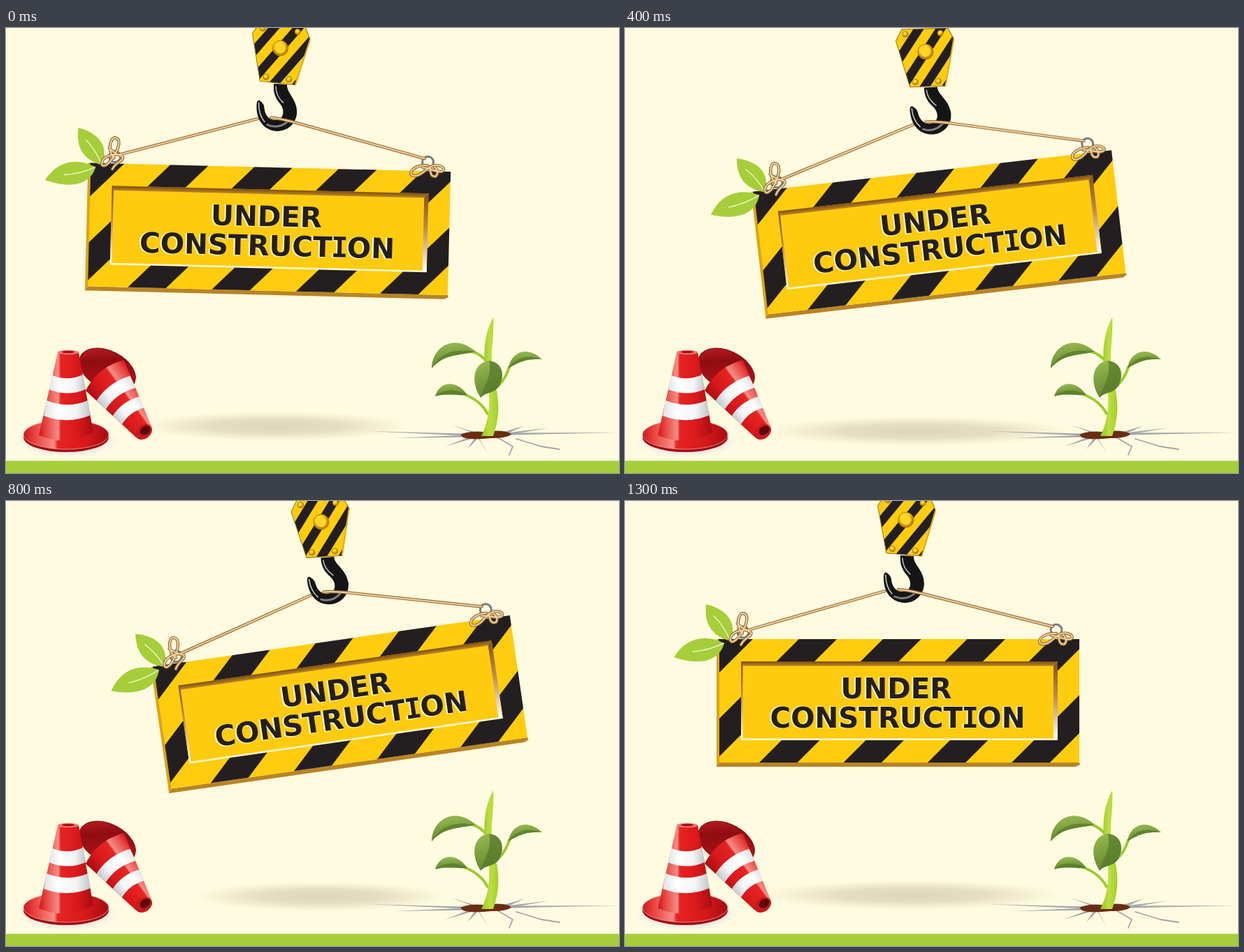
An HTML page for the animation above (1400 ms loop, 877x638 px).

```html
<!DOCTYPE html>
<html lang="en">
<head>
<meta charset="utf-8">
<title>Under construction</title>
<style>
  html, body { margin: 0; width: 100%; height: 100%; overflow: hidden; background: #fffbe0; }
  svg { display: block; width: 877px; height: 638px; }
  text { font: bold 40.4px "DejaVu Sans", Verdana, sans-serif; text-anchor: middle; }
  .serif { font-family: "DejaVu Sans Mono", monospace; }
  .line { fill: none; stroke-linecap: round; stroke-linejoin: round; }
</style>
</head>
<body>
<svg viewBox="0 0 877 638">
  <defs>
    <radialGradient id="soft">
      <stop offset="0" stop-color="#80704e" stop-opacity=".27"/>
      <stop offset=".5" stop-color="#80704e" stop-opacity=".2"/>
      <stop offset=".8" stop-color="#80704e" stop-opacity=".07"/>
      <stop offset="1" stop-color="#80704e" stop-opacity="0"/>
    </radialGradient>
    <radialGradient id="glow">
      <stop offset=".6" stop-color="#dcdcde"/>
      <stop offset="1" stop-color="#f4f3ee" stop-opacity="0"/>
    </radialGradient>
    <linearGradient id="stripes" gradientUnits="userSpaceOnUse" spreadMethod="repeat" x1="223" y1="223" x2="283.2" y2="283.2">
      <stop stop-color="#ffcc0e"/><stop offset=".012" stop-color="#231f20"/>
      <stop offset=".452" stop-color="#231f20"/><stop offset=".464" stop-color="#ffcc0e"/>
    </linearGradient>
    <linearGradient id="bars" gradientUnits="userSpaceOnUse" spreadMethod="repeat" x1="-5.4" y1="-3.8" x2="16.1" y2="11.2">
      <stop stop-color="#ffcc0e"/><stop offset=".04" stop-color="#231f20"/>
      <stop offset=".48" stop-color="#231f20"/><stop offset=".52" stop-color="#ffcc0e"/>
    </linearGradient>
    <linearGradient id="bevel" x2="0" y2="1">
      <stop stop-color="#85521b"/><stop offset=".45" stop-color="#bd8c4a"/><stop offset="1" stop-color="#fff"/>
    </linearGradient>
    <linearGradient id="brown" x2="0" y2="1">
      <stop stop-color="#7d4d17"/><stop offset="1" stop-color="#bd861f"/>
    </linearGradient>
    <radialGradient id="gold" cx=".4" cy=".35">
      <stop stop-color="#ffe870"/><stop offset=".6" stop-color="#fbc90f"/><stop offset="1" stop-color="#c58a0a"/>
    </radialGradient>
    <linearGradient id="red">
      <stop stop-color="#c9171b"/><stop offset=".12" stop-color="#e8403c"/><stop offset=".36" stop-color="#f58f88"/>
      <stop offset=".4" stop-color="#e62422"/><stop offset=".72" stop-color="#d9181b"/><stop offset="1" stop-color="#a50d12"/>
    </linearGradient>
    <linearGradient id="white">
      <stop stop-color="#dfe1e4"/><stop offset=".3" stop-color="#fff"/>
      <stop offset=".7" stop-color="#f3f4f5"/><stop offset="1" stop-color="#c2c4c9"/>
    </linearGradient>
    <linearGradient id="disc" x2="1" y2="1">
      <stop stop-color="#d32428"/><stop offset=".35" stop-color="#8e0d12"/><stop offset="1" stop-color="#c4161b"/>
    </linearGradient>
    <linearGradient id="leaf" x2=".25" y2="1">
      <stop stop-color="#9cbd55"/><stop offset=".5" stop-color="#7fa341"/><stop offset="1" stop-color="#658b33"/>
    </linearGradient>
    <linearGradient id="stem">
      <stop stop-color="#94c527"/><stop offset=".5" stop-color="#bcdf3f"/><stop offset="1" stop-color="#a2d02f"/>
    </linearGradient>

    <g id="cone">
      <path fill="url(#red)" d="M-15 0L-42 119Q-2 136 36 115L15 0Z"/>
      <path fill="url(#white)" d="M-23 33Q0 42 21 32L25 53Q0 64-28 53Z"/>
      <path fill="url(#white)" d="M-31 69Q0 81 28 69L32 90Q0 104-35 91Z"/>
    </g>
    <path id="rope" d="M176 185L372 129M391 127Q402 127 430 134L612 180"/>
    <path id="knots" d="M168 190C157 178 163 160 169 161C179 163 173 180 166 190C159 202 149 206 151 196C154 186 174 182 180 188C183 194 171 195 166 206
      M178 187Q166 182 161 176M617 190C602 189 590 197 594 204C603 209 612 198 620 192C630 186 643 192 639 197C634 202 616 192 610 193M621 193Q620 207 629 205Q634 199 627 192"/>
    <g id="words">
      <text x="388" y="282.5">UNDER</text>
      <text x="390" y="324.5">CONSTRUCT<tspan class="serif" dx="-1.5">I</tspan><tspan dx="-1.5">ON</tspan></text>
    </g>
  </defs>

  <rect width="877" height="638" fill="#fffbe0"/>
  <ellipse id="shadow" fill="url(#soft)" ry="21"/>
  <rect y="620.5" width="877" height="18" fill="#a6ce39"/>

  <!-- plant -->
  <g id="cracks" fill="#a3a6ab"></g>
  <path class="line" stroke="#a3a6ab" stroke-width="1.8" d="M703 587L725 600L720 612M730 589L766 600L792 604"/>
  <path fill="#6a2c13" d="M650 583Q662 577 684 579Q712 575 723 582Q718 588 695 588Q664 591 654 587Z"/>
  <g class="line" stroke="#9ccb30" stroke-width="4">
    <path d="M664 463Q680 467 690 481"/>
    <path d="M720 486Q714 506 700 516"/>
    <path d="M655 525Q679 534 689 553"/>
  </g>
  <path fill="url(#stem)" d="M680 585C693 560 693 532 689 505C681 476 683 440 697 415C699 442 692 465 696 492C702 520 711 545 697 585Z"/>
  <g fill="url(#leaf)">
    <path d="M609 488C609 459 640 436 672 464C646 470 627 467 609 488Z"/>
    <path d="M719 488C722 466 744 454 767 475C748 474 736 477 719 488Z"/>
    <path d="M614 528C619 509 642 501 660 526C644 527 630 523 614 528Z"/>
    <path d="M679 530C665 510 667 480 691 477C713 480 713 501 705 514C697 525 687 521 679 530Z"/>
  </g>
  <g fill="#557828" opacity=".7">
    <path d="M609 488C621 466 640 459 672 464C646 470 627 467 609 488Z"/>
    <path d="M719 488C731 471 746 468 767 475C748 474 736 477 719 488Z"/>
    <path d="M614 528C627 517 642 517 660 526C644 527 630 523 614 528Z"/>
    <path d="M679 530C684 511 696 500 691 477C713 480 713 501 705 514C697 525 687 521 679 530Z"/>
  </g>

  <!-- cones -->
  <ellipse cx="88" cy="592" rx="76" ry="24" fill="url(#glow)"/>
  <ellipse cx="145" cy="490" rx="43" ry="27" transform="rotate(27 145 490)" fill="url(#disc)" stroke="#7a090d"/>
  <use href="#cone" transform="translate(197 579) rotate(144) scale(.9 .84)"/>
  <ellipse cx="197" cy="579" rx="13" ry="10" transform="rotate(-36 197 579)" fill="#c9191d"/>
  <ellipse cx="199" cy="577" rx="8" ry="6" transform="rotate(-36 199 577)" fill="#5d080b"/>
  <ellipse cx="86" cy="587" rx="61" ry="21" fill="#a10e13"/>
  <ellipse cx="86" cy="583" rx="61" ry="21" fill="url(#red)" stroke="#f2a19c" stroke-width=".8"/>
  <use href="#cone" x="89" y="465"/>
  <ellipse cx="89" cy="465" rx="15" ry="3.2" fill="#ef7772"/>
  <ellipse cx="89" cy="464.5" rx="9" ry="1.7" fill="#a51015"/>

  <!-- hanging sign, swinging as one rigid piece -->
  <g id="sign">
    <path fill="#151516" d="M394 78L413 79C412 91 428 99 428 119C427 136 414 146 400 146C382 145 370 132 370 110C370 102 373 101 376 104Q381 108 381 113C383 126 390 131 399 130C410 128 411 115 403 106C396 98 393 90 394 78Z"/>
    <g class="line" stroke="#fff" stroke-width="1.5">
      <path d="M397 82Q397 95 408 105" opacity=".75"/>
      <path d="M373 106Q373 123 382 133" opacity=".8"/>
      <path d="M386 137Q402 144 416 131" opacity=".45" stroke-width="3"/>
    </g>
    <g transform="translate(402 27) rotate(4.7)">
      <path fill="url(#bars)" stroke="#9a7412" d="M-33-33H33L41-17L27 50L-24 50L-42-17Z"/>
      <path class="line" stroke="#e0ae12" stroke-width="2" d="M41-17L27 49"/>
      <g fill="url(#gold)" stroke="#98700a" stroke-width=".8">
        <circle r="11"/><circle cx="-28" cy="-26" r="4"/><circle cx="22" cy="-26" r="4"/>
        <circle cx="-16" cy="43" r="4"/><circle cx="17" cy="43" r="4"/>
      </g>
      <circle r="7.5" fill="#ffd52a"/>
    </g>

    <path fill="#b98424" d="M131 375H650L651 378L645 381H131Z"/>
    <path fill="#dba416" d="M131 198H136V375L131 380Z"/>
    <rect x="135" y="198" width="515" height="177" fill="url(#stripes)"/>
    <rect x="166" y="230" width="453" height="112" fill="#ffcb0f"/>
    <rect x="166" y="230" width="2.5" height="112" fill="url(#bevel)"/>
    <path fill="url(#bevel)" d="M619 230V342L613 340V236Z"/>
    <path fill="url(#brown)" d="M166 230H619L613 236.5H168Z"/>
    <rect x="166" y="340.5" width="453" height="2.5" fill="#fff8d5"/>
    <use href="#words" x="-1.5" y=".5" fill="#fff5b8" stroke="#fff5b8" stroke-width="1.4"/>
    <use href="#words" fill="#231f20"/>

    <path fill="#231f20" d="M134 198L168 199L158 207L164 210L149 210L152 216L141 211L135 217Z"/>
    <g fill="#a6ce39">
      <path d="M116 148C113 174 122 193 151 201C160 178 150 156 116 148Z"/>
      <path d="M70 224C87 196 115 190 142 204C135 229 108 237 70 224Z"/>
    </g>
    <g class="line" stroke="#eef5c4" stroke-width="1.4">
      <path d="M127 165Q141 178 151 201"/><path d="M97 216Q121 214 141 204"/>
    </g>
    <g class="line" stroke="#777c83" stroke-width="3">
      <circle cx="169" cy="188" r="8"/><circle cx="617" cy="185" r="8"/>
    </g>
    <g class="line" stroke="#9b6c35" stroke-width="4.4"><use href="#rope"/><use href="#knots"/></g>
    <g class="line" stroke="#eed3a0" stroke-width="2"><use href="#rope"/><use href="#knots"/></g>
  </g>
</svg>

<script>
const $ = id => document.getElementById(id);

// thin wedges: from x, y to tip x, y
$("cracks").innerHTML = [
  [655, 583, 518, 578], [660, 585, 556, 588], [668, 580, 637, 569],
  [668, 586, 628, 600], [672, 587, 660, 604], [674, 587, 690, 611],
  [714, 580, 742, 570], [718, 582, 877, 580], [715, 582, 778, 573]
].map(([x, y, u, v]) => `<path d="M${x} ${y - 1.5}L${u} ${v}L${x + 3} ${y + 1.5}Z"/>`).join("");

// time, hook x, hook y, tilt, shadow x, shadow y, shadow half-width
const keys = [
  [0, 392.5, 29, 1.4, 385, 571, 195],
  [200, 416, 34, -4.4, 445, 567, 218],
  [400, 430, 34, -6.6, 420, 578, 220],
  [600, 445, 27, -8.8, 450, 564, 160],
  [700, 460, 25, -10.7, 455, 563, 155],
  [800, 451, 30, -8.2, 450, 567, 180],
  [1100, 415, 32, -2.8, 430, 566, 218],
  [1200, 405.5, 29, -1, 420, 565, 218],
  [1300, 402, 27, 0, 410, 565, 215]
];

function pose(t) {
  const i = Math.min(keys.findLastIndex(k => k[0] <= t), keys.length - 2);
  const a = keys[i], b = keys[i + 1], f = (t - a[0]) / (b[0] - a[0]);
  return a.map((v, j) => v + (b[j] - v) * f);
}

function draw(now) {
  const step = Math.floor(now % 1400 / 100) * 100;
  const [, x, y, tilt, sx, sy, half] = pose(step);
  $("sign").setAttribute("transform", `translate(${x} ${y}) rotate(${tilt}) translate(-402 -27)`);
  const shadow = $("shadow");
  shadow.setAttribute("cx", sx);
  shadow.setAttribute("cy", sy);
  shadow.setAttribute("rx", half);
  requestAnimationFrame(draw);
}
draw(performance.now());
</script>
</body>
</html>
```
